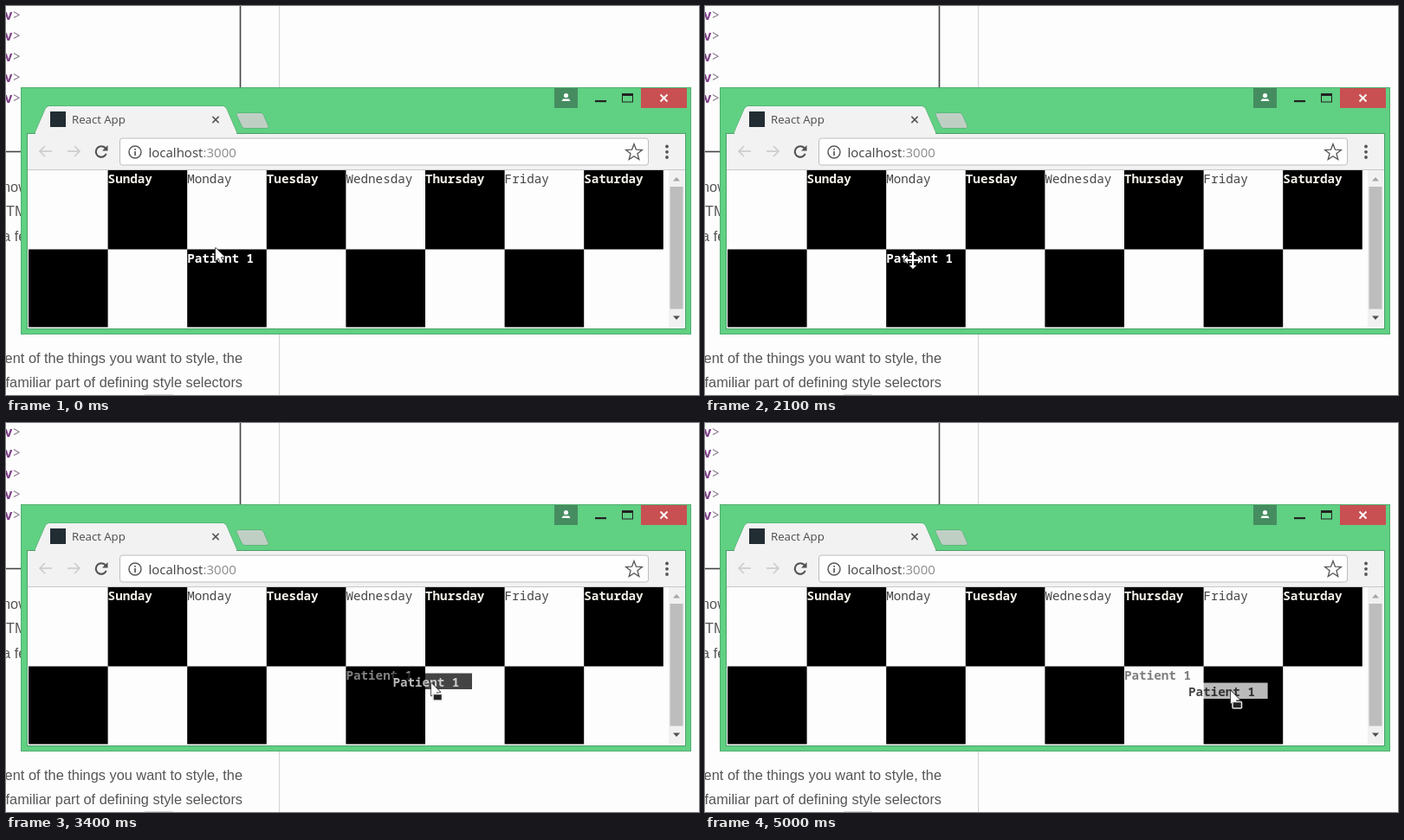
An HTML page with a canvas that plays this animation: 800 px wide and 450 px high, repeating every 5100 ms.

```html
<!DOCTYPE html>
<html lang="en">
<head>
<meta charset="utf-8">
<title>Drag and drop week</title>
<style>
html, body { margin: 0; width: 100%; height: 100%; overflow: hidden; background: #fdfdfd; }
canvas { display: block; }
</style>
</head>
<body>
<canvas id="stage" width="800" height="450"></canvas>
<script>
const ctx = document.getElementById('stage').getContext('2d');
const LOOP = 5100, STEP = 100;
const MONO = '"Noto Sans Mono", monospace';
const UI = '"Open Sans", "Noto Sans", sans-serif';
const PAGE = '16.35px "Liberation Sans", Arial, sans-serif';
const CELL = 91.6, LEFT = 26, ROWS = [190, 281.5, 371.5];
const DAYS = ['Sunday', 'Monday', 'Tuesday', 'Wednesday', 'Thursday', 'Friday', 'Saturday'];

// Pointer path: time, x, y
const PATH = [
  [0, 242, 280], [600, 378, 217], [1400, 466, 265], [2000, 240, 294], [2200, 240, 294],
  [2600, 446, 313], [2800, 448, 314], [3100, 437, 293], [3200, 437, 293],
  [3600, 545, 309], [4000, 552, 297], [4300, 533, 291], [4500, 533, 291],
  [5000, 607, 310], [5100, 610, 311]
];
// Each drag starts in one column and drops in another
const DRAGS = [
  { start: 2200, end: 2600, from: 2, to: 4 },
  { start: 3200, end: 3600, from: 4, to: 5 },
  { start: 4500, end: 5100, from: 5, to: 6 }
];

const colX = c => LEFT + c * CELL;

function box(x, y, w, h, color) {
  ctx.fillStyle = color;
  ctx.fillRect(x, y, w, h);
}

function text(str, x, y, font, color, align = 'left') {
  ctx.font = font;
  ctx.fillStyle = color;
  ctx.textAlign = align;
  ctx.fillText(str, x, y);
}

function trace(points, close = false) {
  ctx.beginPath();
  points.forEach(([x, y]) => ctx.lineTo(x, y));
  if (close) ctx.closePath();
}

function line(points, color, width = 1) {
  trace(points);
  ctx.strokeStyle = color;
  ctx.lineWidth = width;
  ctx.stroke();
}

function shape(points, fill, stroke, width = 1) {
  trace(points, true);
  if (stroke) {
    ctx.strokeStyle = stroke;
    ctx.lineWidth = width;
    ctx.stroke();
  }
  ctx.fillStyle = fill;
  ctx.fill();
}

function disc(x, y, r, color) {
  ctx.beginPath();
  ctx.arc(x, y, r, 0, Math.PI * 2);
  ctx.fillStyle = color;
  ctx.fill();
}

function cross(x, y, r, color, width) {
  line([[x - r, y - r], [x + r, y + r]], color, width);
  line([[x - r, y + r], [x + r, y - r]], color, width);
}

function drawPage() {
  box(0, 0, 800, 450, '#fdfdfd');
  for (let i = 0; i < 5; i++) {
    const y = 15.5 + i * 24.1;
    text('v', -2, y, `bold 16px ${MONO}`, '#7d3f87');
    text('>', 7.5, y, `16px ${MONO}`, '#8a7a8c');
  }
  line([[270.5, 0], [270.5, 95]], '#444', 1.6);
  line([[0, 168.5], [18, 168.5]], '#444', 1.6);
  line([[315.5, 0], [315.5, 450]], '#d2d2d2');
  text('now', -4, 215, PAGE, '#555');
  text('TM', 0, 243, PAGE, '#555');
  text('a fe', -4, 271.5, PAGE, '#555');
  text('ent of the things you want to style, the', 273, 413, PAGE, '#555', 'right');
  text('familiar part of defining style selectors', 273, 441, PAGE, '#555', 'right');
  box(160, 449, 33, 1, '#d5d5d5');
}

function drawWindow() {
  box(17, 94, 774, 286, '#4fae6e');
  box(18, 95, 772, 284, '#60d083');

  // Window buttons
  box(633, 95, 27, 23, '#458c60');
  disc(646.5, 103.5, 2.6, '#fff');
  shape([[641.5, 110], [643, 107.5], [650, 107.5], [651.5, 110]], '#fff');
  box(680, 109, 13, 2.2, '#222');
  ctx.strokeStyle = '#222';
  ctx.lineWidth = 1;
  ctx.strokeRect(711.5, 102.5, 12, 8.5);
  box(711, 101, 13, 3, '#222');
  box(733, 95, 53, 23, '#c85052');
  cross(759.5, 106.5, 4, '#fff', 1.9);

  // Tabs
  shape([[33, 148], [46, 118], [49, 116], [251, 116], [254, 118], [267, 148]], '#f2f2f2', '#4b9f68');
  shape([[266, 125], [268, 124], [295, 124], [297, 126], [303, 140], [301, 141], [275, 141], [273, 140]],
    '#bfcfc4', '#51a36d');
  box(51, 122, 18, 18, '#222c33');
  text('React App', 76, 136, `13.2px ${UI}`, '#4a4a4a');
  cross(242, 131.5, 3.6, '#555', 1.5);

  // Toolbar
  box(24, 147, 761, 227, '#4b9f68');
  box(25, 148, 759, 42, '#f2f2f2');
  box(34, 147, 232, 2, '#f2f2f2');
  for (const [x, dir] of [[46, -1], [78, 1]]) {
    line([[x - 7 * dir, 168], [x + 7 * dir, 168]], '#cdcdcd', 1.7);
    line([[x + dir, 162], [x + 7 * dir, 168], [x + dir, 174]], '#cdcdcd', 1.7);
  }
  ctx.beginPath();
  ctx.arc(110, 168.5, 6.2, 0.4, Math.PI * 1.78);
  ctx.strokeStyle = '#505050';
  ctx.lineWidth = 2;
  ctx.stroke();
  shape([[117.5, 161], [117.5, 167.5], [111, 167.5]], '#505050');

  ctx.beginPath();
  ctx.roundRect(131.5, 153, 610, 31, 3);
  ctx.fillStyle = '#fefefe';
  ctx.fill();
  ctx.strokeStyle = '#bdbdbd';
  ctx.lineWidth = 1;
  ctx.stroke();
  ctx.beginPath();
  ctx.arc(149, 169, 7, 0, Math.PI * 2);
  ctx.strokeStyle = '#5a5a5a';
  ctx.lineWidth = 1.5;
  ctx.stroke();
  box(148.2, 165, 1.7, 1.8, '#5a5a5a');
  box(148.2, 168, 1.7, 5, '#5a5a5a');
  text('localhost', 164.5, 174.5, `15px ${UI}`, '#404040');
  text(':3000', 227.5, 174.5, `15px ${UI}`, '#8b8b8b');

  const star = Array.from({ length: 10 }, (_, i) => {
    const a = -Math.PI / 2 + i * Math.PI / 5, r = i % 2 ? 3.4 : 8;
    return [725 + r * Math.cos(a), 169.5 + r * Math.sin(a)];
  });
  shape(star, '#fefefe', '#555', 2.6);
  for (const y of [162.5, 168.8, 175]) disc(763, y, 1.9, '#555');

  // Viewport and scrollbar
  box(25, 189, 759, 1, '#c8c8c8');
  box(25, 190, 759, 183, '#fdfdfe');
  box(765, 190, 18, 181, '#f1f1f1');
  box(766.5, 209, 15, 141.5, '#bdbdbd');
  shape([[770, 202.5], [774, 198], [778, 202.5]], '#a6a6a6');
  shape([[770, 358.5], [778, 358.5], [774, 363]], '#505050');
}

function patient(x, y, color) {
  text('Patient 1', x, y + 15, `bold 14.25px ${MONO}`, color);
}

function drawBoard(column, dragging) {
  for (let row = 0; row < 2; row++)
    for (let col = 0; col < 8; col++)
      if ((row + col) % 2) box(colX(col - 0) , ROWS[row], CELL, ROWS[row + 1] - ROWS[row], '#000');
      else if (row === 1 && col % 2) continue;
  DAYS.forEach((day, i) => {
    const dark = i % 2 === 0;
    text(day, colX(i + 1), 205, `${dark ? 'bold ' : ''}14.25px ${MONO}`, dark ? '#f5f2ea' : '#444');
  });
  ctx.globalAlpha = dragging ? 0.5 : 1;
  patient(colX(column), ROWS[1], column % 2 ? '#000' : '#fff');
  ctx.globalAlpha = 1;
}

function drawGhost(column, dx, dy) {
  const x = colX(column) + dx, y = ROWS[1] + dy, dark = column % 2 === 0;
  ctx.globalAlpha = 0.73;
  box(x, y, CELL, 18.5, dark ? '#000' : '#fff');
  patient(x, y, dark ? '#fff' : '#000');
  ctx.globalAlpha = 1;
}

function drawPointer(x, y, kind) {
  ctx.save();
  ctx.translate(x, y);
  ctx.lineJoin = 'round';
  if (kind === 'move') {
    const arm = [[1, -1], [1, -6], [4, -6], [0, -10], [-4, -6], [-1, -6]];
    const points = [0, 1, 2, 3].flatMap(q => arm.map(([px, py]) => {
      const a = -q * Math.PI / 2;
      return [px * Math.cos(a) - py * Math.sin(a), px * Math.sin(a) + py * Math.cos(a)];
    }));
    shape(points, '#fff', '#222', 1.8);
  } else {
    shape([[0, 0], [0, 14.5], [3.3, 11.5], [5.8, 17.3], [8.3, 16.2], [5.8, 10.6], [10.3, 10.3]],
      '#fff', '#333', 1.6);
    if (kind === 'drag') {
      ctx.beginPath();
      ctx.roundRect(2, 12.5, 10.5, 7.5, 1);
      ctx.fillStyle = '#222';
      ctx.fill();
      ctx.strokeStyle = '#e8e8e8';
      ctx.lineWidth = 1.5;
      ctx.stroke();
    }
  }
  ctx.restore();
}

function pointerAt(t) {
  const i = Math.max(1, PATH.findIndex(p => p[0] > t));
  const [t0, x0, y0] = PATH[i - 1], [t1, x1, y1] = PATH[i];
  const u = (t - t0) / (t1 - t0), e = u * u * (3 - 2 * u);
  return [x0 + (x1 - x0) * e, y0 + (y1 - y0) * e];
}

function draw(t) {
  const [x, y] = pointerAt(t);
  const drag = DRAGS.find(d => t > d.start && t < d.end);
  const column = DRAGS.reduce((c, d) => t >= d.end ? d.to : c, 2);
  const hover = x >= colX(column) && x < colX(column + 1) && y >= ROWS[1] && y < ROWS[1] + 19;
  drawPage();
  drawWindow();
  drawBoard(column, drag);
  if (drag) {
    const [sx, sy] = pointerAt(drag.start);
    drawGhost(column, x - sx, y - sy);
  }
  drawPointer(x, y, drag ? 'drag' : hover ? 'move' : 'arrow');
}

const begin = performance.now();
function tick() {
  const t = (performance.now() - begin) % LOOP;
  draw(Math.floor(t / STEP) * STEP);
  requestAnimationFrame(tick);
}
tick();
</script>
</body>
</html>
```
